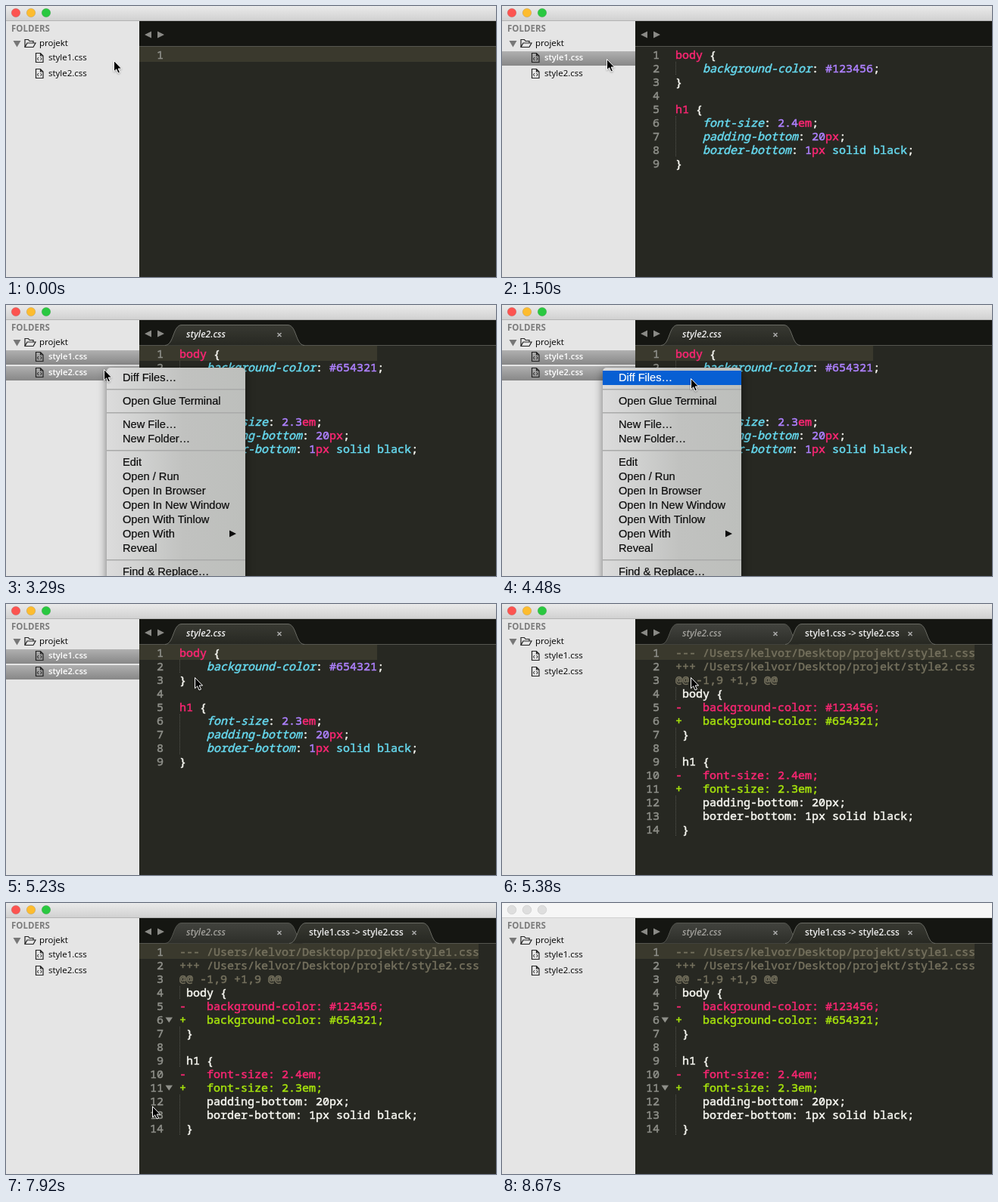
Write an HTML page that moves like this. It is 647 by 359 pixels and loops after 9.34 s.

```html
<!DOCTYPE html>
<html lang="en">
<head>
<meta charset="utf-8">
<title>Comparing two files in an editor</title>
<style>
html, body { margin: 0; width: 100%; height: 100%; overflow: hidden; background: #272822; }
svg { display: block; width: 647px; height: 359px; }
text { white-space: pre; }
.ui { font: 11.5px "Open Sans", sans-serif; }
.ui.strong { font-weight: 700; fill: #7d7d7d; }
.ui.picked { font-size: 11.2px; font-weight: 600; fill: #fff; }
.tab { font: 600 11.8px "Open Sans", sans-serif; fill: #eee; }
.tab.slant { font-size: 12.1px; font-style: italic; }
.tab.dim { fill: #a09f9a; }
.code { font: 15px "Noto Sans Mono", monospace; color: #f8f8f2; }
.code, .code tspan { fill: currentColor; stroke: currentColor; stroke-width: .5px; }
.menu { font: 14.6px "Liberation Sans", Arial, sans-serif; color: #0c0c0c; fill: currentColor; stroke: currentColor; stroke-width: .2px; }
.menu.lit { color: #fff; }
.num { color: #8f908a; text-anchor: end; }
.tag, .unit, .del { color: #f92672; }
.prop { color: #66d9ef; font-style: italic; }
.word { color: #66d9ef; }
.val { color: #ae81ff; }
.add { color: #a6e30c; }
.head { color: #75715e; }
.guide { stroke: #55564f; stroke-dasharray: 1 1; }
#menu { filter: drop-shadow(0 4px 6px rgba(0, 0, 0, .5)); }
#arrow { filter: drop-shadow(0 1px 1px rgba(0, 0, 0, .3)); }
</style>
</head>
<body>
<svg id="stage" viewBox="0 0 647 359"></svg>
<script>
const LOOP = 9340;
const STEP = 140;

const text = (x, y, s, cls, extra = "") => `<text x="${x}" y="${y}" class="${cls}" ${extra}>${s}</text>`;
const rect = (x, y, w, h, fill, extra = "") =>
  `<rect x="${x}" y="${y}" width="${w}" height="${h}" fill="${fill}" ${extra}/>`;
const path = (d, fill, extra = "") => `<path d="${d}" fill="${fill}" ${extra}/>`;
const group = (id, body) => `<g id="${id}">${body}</g>`;
const span = (cls, s) => `<tspan class="${cls}">${s}</tspan>`;
const gradient = (id, stops, across) =>
  `<linearGradient id="${id}" x2="${across ? 1 : 0}" y2="${across ? 0 : 1}">` +
  stops.map(([at, c]) => `<stop offset="${at}" stop-color="${c}"/>`).join("") + "</linearGradient>";

const base = n => 52 + 18 * n;

function listing(lines, guides) {
  return guides.map(n => path(`M229.5 ${base(n) - 14}v18`, "none", 'class="guide"')).join("") +
    lines.map((s, i) => text(208, base(i + 1), i + 1, "code num") + text(229, base(i + 1), s, "code")).join("");
}

// Stylesheet listing with the two values that differ
function sheet(color, size) {
  const rule = (name, value) => `    ${span("prop", name)}: ${value};`;
  const measure = (n, unit) => span("val", n) + span("unit", unit);
  return listing([
    span("tag", "body") + " {",
    rule("background-color", span("val", color)),
    "}",
    "",
    span("tag", "h1") + " {",
    rule("font-size", measure(size, "em")),
    rule("padding-bottom", measure(20, "px")),
    rule("border-bottom", measure(1, "px") + span("word", " solid black")),
    "}"
  ], [2, 6, 7, 8]);
}

function diff() {
  const lines = [
    "--- /Users/kelvor/Desktop/projekt/style1.css",
    "+++ /Users/kelvor/Desktop/projekt/style2.css",
    "@@ -1,9 +1,9 @@",
    " body {",
    "-   background-color: #123456;",
    "+   background-color: #654321;",
    " }",
    " ",
    " h1 {",
    "-   font-size: 2.4em;",
    "+   font-size: 2.3em;",
    "    padding-bottom: 20px;",
    "    border-bottom: 1px solid black;",
    " }"
  ];
  const kind = { "-": "del", "+": "add", " ": "" };
  return listing(lines.map((s, i) => span(i < 3 ? "head" : kind[s[0]], s)), [4, 7, 8, 9, 12, 13, 14]);
}

function lights(fills, edge) {
  return fills.map((c, i) =>
    `<circle cx="${13 + 20 * i}" cy="9" r="5.8" fill="${c}" stroke="${edge}" stroke-width=".6"/>`).join("");
}

function file(y, name, cls = "ui") {
  return path(`M39.5 ${y - 5.5}h6l3.5 3.5v8.5h-9.5zM45.5 ${y - 5.5}v3.5h3.5`, "none", 'stroke="#222" stroke-width="1.2"') +
    path(`M43 ${y}l-1.6 2 1.6 2M45.5 ${y}l1.6 2-1.6 2`, "none", 'stroke="#222"') +
    text(56, y + 4, name, cls);
}

const selected = (y, name) => rect(0, y - 8, 176, 19, "url(#pick)") + file(y, name, "ui picked");

function tab(x, w, active) {
  const d = `M${x} 53.5C${x + 12} 53 ${x + 10} 26.5 ${x + 22} 26.5H${x + w - 22}` +
    `C${x + w - 10} 26.5 ${x + w - 12} 53 ${x + w} 53.5`;
  return path(d, active ? "url(#front)" : "url(#back)", `stroke="${active ? "#6a6b64" : "#555650"}"`);
}

const close = x => path(`M${x - 2.5} 37l5 5m0-5l-5 5`, "none", 'stroke="#aaa" stroke-width="1.5"');
const tabTitle = (s, cls = "") => text(238, 43, s, "tab slant " + cls);

function menu() {
  const items = [
    [127, "Open Glue Terminal"], [158, "New File…"], [177, "New Folder…"],
    [208, "Edit"], [227, "Open / Run"], [246, "Open In Browser"], [265, "Open In New Window"],
    [284, "Open With Tinlow"], [303, "Open With"], [322, "Reveal"], [353, "Find &amp; Replace…"]
  ];
  return rect(133, 83, 183, 300, "url(#glass)", 'rx="5"') +
    [112, 143, 193, 338].map(y => rect(133, y - 1, 183, 1.5, "#a9aaa9")).join("") +
    items.map(([y, s]) => text(154, y + 5, s, "menu")).join("") +
    path("M295 298.5l9 4.5-9 4.5z", "#0c0c0c") +
    group("hover", rect(133, 87, 183, 19, "#075fd3")) +
    text(154, 101, "Diff Files…", "menu", 'id="first"');
}

const beam = "M-3.5-8Q0-8 0-6V6Q0 8-3.5 8M3.5-8Q0-8 0-6M0 6Q0 8 3.5 8M-2 3H2";

document.getElementById("stage").innerHTML =
  "<defs>" +
  gradient("bar", [[0, "#eaeaea"], [1, "#d0d0d0"]]) +
  gradient("pick", [[0, "#b0b0b0"], [1, "#878787"]]) +
  gradient("front", [[0, "#383932"], [1, "#272822"]]) +
  gradient("back", [[0, "#42433e"], [1, "#2d2e29"]]) +
  gradient("glass", [[0, "#dcdcdc"], [.25, "#d0d1d0"], [.55, "#c1c2c0"], [1, "#bdbfbc"]], true) +
  "</defs>" +
  rect(0, 0, 647, 359, "#272822") +
  rect(176, 20, 471, 34, "#151612") +
  rect(176, 53, 471, 1, "#55564f") +
  path("M192 33.5v9l-9-4.5zM200 33.5v9l9-4.5z", "#8a8a86") +
  rect(176, 54, 471, 20, "#3a392d", 'id="line"') +
  group("blank", text(208, base(1), 1, "code num")) +
  group("sheet1", sheet("#123456", "2.4")) +
  group("sheet2", sheet("#654321", "2.3")) +
  group("single", tab(210, 184, true) + close(361)) +
  group("title1", tabTitle("style1.css")) +
  group("title2", tabTitle("style2.css")) +
  group("diff", diff() + tab(210, 184, false) + close(361) + tabTitle("style2.css", "dim") +
    tab(374, 198, true) + close(539) + text(400, 43, "style1.css -&gt; style2.css", "tab")) +
  group("folds", path("M210.5 151.5h9.5l-4.75 7zM210.5 241.5h9.5l-4.75 7z", "#8f908a")) +
  rect(0, 20, 176, 339, "#e5e5e5") +
  text(7, 34, "FOLDERS", "ui strong") +
  path("M9.5 46h10l-5 8.5z", "#777") +
  path("M25 54.5v-10h4.5l1.5 2h5v2.5M25 54.5l3-5.5h11l-3 5.5z", "none", 'stroke="#222" stroke-width="1.2"') +
  text(44, 53, "projekt", "ui") +
  file(68, "style1.css") + file(89, "style2.css") +
  group("row1", selected(68, "style1.css")) +
  group("row2", selected(89, "style2.css")) +
  rect(0, 0, 647, 20, "url(#bar)") + rect(0, 19, 647, 1, "#b3b3b3") +
  lights(["#fc5450", "#fdbc2f", "#2ac840"], "rgba(0,0,0,.18)") +
  group("idle", rect(0, 0, 647, 20, "#f6f6f6") + rect(0, 19, 647, 1, "#d2d2d2") +
    lights(["#dedede", "#dedede", "#dedede"], "#c6c6c6")) +
  group("menu", menu()) +
  group("arrow", path("M.5.5V14.8L3.7 11.8 6 17 8.5 16 6.2 11H10.6z", "#000", 'stroke="#fff" stroke-linejoin="round"')) +
  group("beam", path(beam, "none", 'stroke="#eee" stroke-width="2.6"') + path(beam, "none", 'stroke="#222" stroke-width=".9"'));

const el = {};
document.querySelectorAll("[id]").forEach(e => el[e.id] = e);

// Visible spans: id, from, to
const spans = [
  ["blank", 0, 1500], ["sheet1", 1500, 2540], ["sheet2", 2540, 5380], ["diff", 5380, LOOP],
  ["single", 1800, 5380], ["title1", 1800, 2540], ["title2", 2540, 5380],
  ["row1", 1500, 5380], ["row2", 2540, 5380], ["menu", 3290, 5230],
  ["folds", 7780, LOOP], ["idle", 8520, LOOP], ["beam", 6130, 7480]
];

// Pointer moves: start, steps, x, y
const moves = [
  [600, 2, 140, 71], [1050, 2, 138, 70], [1800, 3, 129, 85], [3590, 7, 249, 97],
  [6130, 3, 255, 110], [6730, 5, 234, 199], [7480, 2, 196, 267], [7780, 2, 193, 269]
];

function pointer(t) {
  let x = 142, y = 72;
  for (const [start, steps, toX, toY] of moves) {
    if (t < start) break;
    const k = Math.min(1, (Math.floor((t - start) / STEP) + 1) / steps);
    const ease = k * k * (3 - 2 * k);
    x += (toX - x) * ease;
    y += (toY - y) * ease;
  }
  return [Math.round(x), Math.round(y)];
}

const show = (e, on) => e.style.display = on ? "" : "none";

function draw(t) {
  for (const [id, from, to] of spans) show(el[id], t >= from && t < to);
  const [x, y] = pointer(t);
  const isBeam = t >= 6130 && t < 7480;
  show(el.arrow, !isBeam && t < 8370);
  for (const e of [el.arrow, el.beam]) e.setAttribute("transform", `translate(${x} ${y})`);

  const over = t >= 3590 && x > 133 && y >= 87;
  show(el.hover, over);
  el.first.classList.toggle("lit", over);

  show(el.line, t < 1500 || t >= 2540);
  el.line.setAttribute("width", t < 1500 ? 471 : t < 5380 ? 314 : 448);
  el.folds.style.opacity = t < 7920 ? .5 : 1;
}

const begin = performance.now();
function tick() {
  draw((performance.now() - begin) % LOOP);
  requestAnimationFrame(tick);
}
tick();
</script>
</body>
</html>
```
